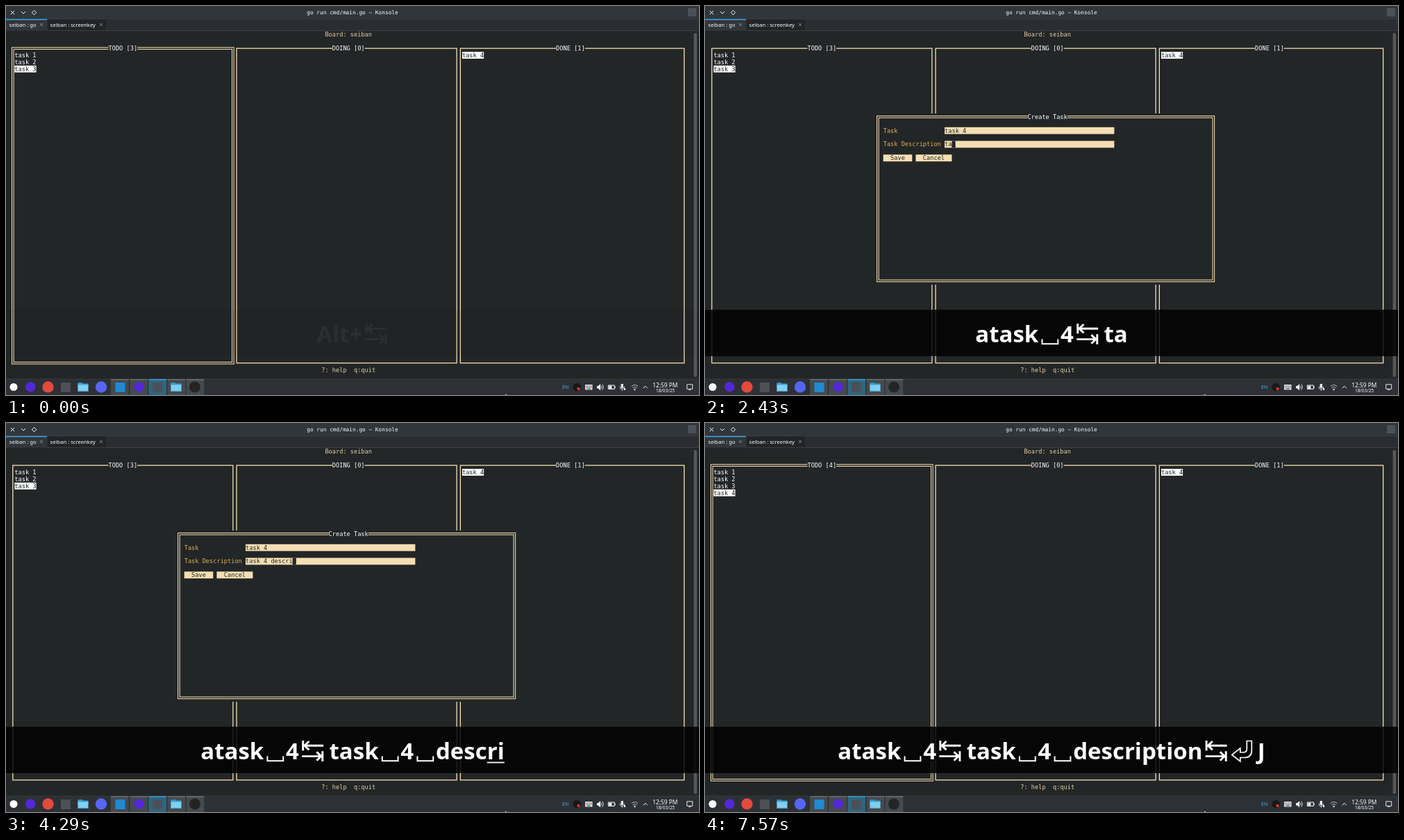
An HTML page with a canvas that plays this animation: 998 px wide and 561 px high, repeating every 8000 ms.

```html
<!DOCTYPE html>
<html lang="en">
<head>
<meta charset="utf-8">
<title>Terminal board</title>
<style>
html, body { margin: 0; height: 100%; overflow: hidden; background: #232627; }
canvas { display: block; width: 100vw; height: 100vh; }
</style>
</head>
<body>
<canvas></canvas>
<script>
const W = 998, H = 561, LOOP = 8000;
const CELL_W = 5.198, CELL_H = 9.876, LEFT = 2, TOP = 36.5;
const BG = '#232627', WHEAT = '#f5deb3', WHITE = '#fcfcfc', LABEL = '#e0ae55', PANEL = '#2d3136';
const MONO = '"DejaVu Sans Mono", monospace', SANS = '"Noto Sans", sans-serif';
const TERM_FONT = `8.63px ${MONO}`, KEY_FONT = `bold 33px ${SANS}`;

// Key presses: time, keys, and whether they are underlined for a moment.
const KEYS = [
  [290, 'a'],
  [1140, 't'], [1290, 'a'], [1430, 's'], [1570, 'k'], [1710, ' '], [1860, '4'], [2140, '⇆'],
  [2290, 't'], [2430, 'a'], [2570, 's'], [2710, 'k'], [2860, ' '], [3290, '4'], [3570, ' '],
  [3710, 'd'], [3860, 'e'], [4000, 's'], [4140, 'c'], [4290, 'ri', true],
  [4430, 'p'], [4570, 't'], [4710, 'i'], [4860, 'o'], [5000, 'n'], [5140, '⇆'],
  [5290, '⏎', true], [6140, 'J']
];
const RECENT_MS = 140;

const canvas = document.querySelector('canvas');
const ctx = canvas.getContext('2d');
const scale = window.devicePixelRatio || 1;
canvas.width = Math.round(W * scale);
canvas.height = Math.round(H * scale);

const colX = c => LEFT + c * CELL_W;
const rowY = r => TOP + r * CELL_H;

function rect(x, y, w, h, color) {
  ctx.fillStyle = color;
  ctx.fillRect(x, y, w, h);
}

function disc(x, y, r, color) {
  ctx.fillStyle = color;
  ctx.beginPath();
  ctx.arc(x, y, r, 0, 7);
  ctx.fill();
}

function text(str, x, y, font, color, align = 'left') {
  ctx.font = font;
  ctx.fillStyle = color;
  ctx.textAlign = align;
  ctx.fillText(str, x, y);
}

function stroke(path, x, y, color = WHITE, width = 1) {
  ctx.save();
  ctx.translate(x, y);
  ctx.strokeStyle = color;
  ctx.lineWidth = width;
  ctx.stroke(new Path2D(path));
  ctx.restore();
}

function cells(str, col, row, color, fill) {
  if (fill) rect(colX(col), rowY(row), str.length * CELL_W, CELL_H, fill);
  text(str, colX(col), rowY(row) + 7.9, TERM_FONT, color);
}

function frame(c0, r0, c1, r1, isDouble, title, titleCol) {
  const x = colX(c0 + .5), y = rowY(r0 + .5) - .1;
  const w = (c1 - c0) * CELL_W, h = (r1 - r0) * CELL_H - .5;
  ctx.strokeStyle = WHEAT;
  ctx.lineWidth = isDouble ? 1.05 : 1.3;
  for (const d of isDouble ? [-1.3, 1.3] : [0])
    ctx.strokeRect(x + d, y + d, w - 2 * d, h - 2 * d);
  cells(title, titleCol, r0, WHITE, BG);
}

function drawWindow() {
  rect(0, 0, W, H, BG);
  rect(0, 0, W, 18.5, '#31363b');
  rect(0, 18.5, W, 17, '#2a2e32');
  rect(0, 18.5, W, .6, '#44494d');
  rect(60, 19.5, 84, 15.5, '#222528');
  rect(0, 19, 59, 16.5, '#31363b');
  rect(0, 18.8, 59, 1.4, '#3daee9');
  rect(59, 35, W - 59, .7, '#454a4e');

  stroke('M-2.6-2.6L2.6 2.6M2.6-2.6L-2.6 2.6', 9.5, 9.5);
  stroke('M-3-1.5L0 1.5L3-1.5', 25, 9.5);
  stroke('M0-3.2L3.2 0L0 3.2L-3.2 0Z', 40.5, 9.5);
  rect(982, 3, 12, 12, '#4b5157');
  text('go run cmd/main.go — Konsole', 499, 12.2, `7.8px ${MONO}`, WHITE, 'center');
  text('seiban : go', 4.6, 29.8, `7.63px ${SANS}`, WHITE);
  text('seiban : screenkey', 63.6, 29.8, `7.63px ${SANS}`, WHITE);
  for (const x of [51, 137])
    stroke('M-2-2L2 2M2-2L-2 2', x, 26.8, '#a0a4a8', .8);

  rect(986.5, 36, .6, 502, '#2b2f32');
  ctx.fillStyle = '#55595c';
  ctx.beginPath();
  ctx.roundRect(990.5, 39, 4.5, 496, 2);
  ctx.fill();
}

function folder(x) {
  rect(x - 7.5, 543, 7, 4, '#2d8dbb');
  rect(x - 7.5, 544.5, 15, 5, '#3aa5d8');
  rect(x - 7.5, 546.5, 15, 9.5, '#83cff0');
  rect(x - 7.5, 554.7, 15, 1.3, '#4eaad4');
}

function drawTaskbar() {
  rect(0, 538, W, 23, PANEL);
  rect(0, 537.6, W, .6, '#3b4045');
  for (const x of [151, 178.3, 205.3, 232.5, 259.5]) {
    const active = x === 205.3;
    rect(x, 538.5, 25.8, 22.5, active ? '#2f6580' : '#454a4e');
    rect(x, 538.2, 25.8, 1.2, active ? '#3daee9' : '#73787c');
  }
  disc(11, 549.5, 5.5, WHITE);
  disc(35.3, 549.5, 7.2, '#5428d8');
  disc(60.5, 549.5, 8.2, '#e24a3c');
  rect(79, 543, 14, 14, '#4b5157');
  folder(111);
  disc(137, 549.5, 8.2, '#5865f2');
  rect(157.5, 543, 14, 14, '#1f8ad2');
  disc(191.5, 549.5, 7.2, '#5428d8');
  rect(211, 543, 14, 14, '#4b5157');
  folder(245);
  disc(272, 549.5, 8, '#242427');

  text('EN', 801, 552.4, `7px ${SANS}`, '#3daee9');
  disc(822.2, 549.7, 5.8, '#17181a');
  disc(824.5, 552, 2.2, '#e03030');
  rect(834, 546, 10.5, 7.5, '#e6e7e8');
  for (let i = 0; i < 4; i++) rect(835.2 + i * 2.3, 547.5, 1.2, 1.1, PANEL);
  for (let i = 0; i < 4; i++) rect(835.2 + i * 2.3, 549.5, 1.2, 1.1, PANEL);
  rect(836.5, 551.6, 5.5, .9, PANEL);

  ctx.fillStyle = WHITE;
  ctx.fill(new Path2D('M851 548H853L856 545V554.5L853 551.5H851Z'));
  stroke('M0-2Q2 0 0 2M1.5-4Q5 0 1.5 4', 857, 549.7, WHITE, .9);
  stroke('M-5-2.7H4V2.7H-5ZM5-1V1', 872.3, 549.7);
  rect(868.3, 547.8, 4, 4, WHITE);
  rect(885.7, 545, 3.2, 6, WHITE);
  stroke('M-3-1V1Q-3 3 0 3Q3 3 3 1V-1M0 3V5.5', 887.3, 549.5, WHITE, .8);
  rect(890, 551, 2, 3, WHITE);
  stroke('M-4.7-2Q0-6 4.7-2M-3 .2Q0-2.5 3 .2M-1.4 2.2Q0 1 1.4 2.2', 905.5, 550.5, '#b8bbbe', 1);
  disc(905.5, 553.4, .9, WHITE);
  stroke('M-3 1.5L0-1.5L3 1.5', 920.7, 549.7);
  text('12:59 PM', 949.3, 549.8, `8.3px ${SANS}`, WHITE, 'center');
  text('18/03/25', 949.5, 556.7, `6.5px ${SANS}`, WHITE, 'center');
  stroke('M-4-3.5H4V3H-4ZM-1.5 4.3H1.5', 984.7, 549.3, WHITE, .9);
  rect(719, 560, 1.6, 1, WHITE);
}

function drawBoard(typed) {
  const open = typed !== '' && !typed.includes('⏎');
  const saved = typed.includes('⏎');
  const count = saved ? 4 : 3;
  const selected = typed.endsWith('J') ? 4 : 3;

  cells('Board: seiban', 88, 0, '#e3cfa8');
  frame(1, 2, 62, 48, !open, `TODO [${count}]`, 28);
  frame(63, 2, 124, 48, false, 'DOING [0]', 90);
  frame(125, 2, 187, 48, false, 'DONE [1]', 152);
  for (let i = 1; i <= count; i++) {
    const on = i === selected;
    cells('task ' + i, 2, 2 + i, on ? BG : WHITE, on && WHITE);
  }
  cells('task 4', 126, 3, BG, WHITE);
  cells('?: help  q:quit', 87, 49, '#e3cfa8');
  if (open) drawForm(typed.slice(1).split('⇆'));
}

function drawForm(values) {
  const focus = values.length - 1;
  rect(colX(47), rowY(12), 94 * CELL_W, 25 * CELL_H, BG);
  frame(47, 12, 140, 36, true, 'Create Task', 89);
  ['Task', 'Task Description'].forEach((label, i) => {
    const row = 14 + 2 * i, value = values[i] || '';
    cells(label, 49, row, LABEL);
    cells(value.padEnd(47), 66, row, BG, WHEAT);
    if (focus === i) rect(colX(66 + value.length), rowY(row), CELL_W, CELL_H, BG);
  });
  const onSave = focus === 2;
  cells('  Save  ', 49, 18, onSave ? WHEAT : BG, onSave ? BG : WHEAT);
  cells('  Cancel  ', 58, 18, BG, WHEAT);
}

const GLYPHS = {
  ' ': { advance: 31.75, path: 'M5.2 480.5V487.2H28V480.5', width: 2 },
  '⇆': {
    advance: 37.7, width: 2.9,
    path: 'M5.8 458V472.5M35.3 465.2H8M14.5 459L8 465.2L14.5 471.4' +
          'M33.9 473.2V488M4.3 480.6H32M25.5 474.4L32 480.6L25.5 486.8'
  },
  '⏎': {
    advance: 33.5, width: 1.7,
    path: 'M24 458.5H31V472Q31 482.5 21 482.5H14.5V488L2.5 478.5L14.5 469V475H19Q24 475 24 470Z'
  }
};

function layout(keys) {
  const items = keys.match(/[^ ⇆⏎]+|[ ⇆⏎]/g);
  let x = 0;
  ctx.font = KEY_FONT;
  const placed = items.map((str, i) => {
    const prev = items[i - 1];
    if (prev === '⇆' || prev === '⏎') x += str === '⏎' ? 2.3 : 5.9;
    const glyph = GLYPHS[str];
    const item = { str, glyph, x, w: glyph ? glyph.advance : ctx.measureText(str).width };
    x += item.w;
    return item;
  });
  return { placed, width: x };
}

function drawKeys(keys, recent, alpha) {
  const { placed, width } = layout(keys);
  const start = 499 - width / 2;
  ctx.globalAlpha = alpha;
  rect(0, 438, W, 67, 'rgba(0,0,0,.84)');
  for (const { str, glyph, x } of placed) {
    if (glyph) stroke(glyph.path, start + x, 0, '#fff', glyph.width);
    else text(str, start + x, 484.6, KEY_FONT, '#fff');
  }
  if (recent) {
    const last = placed[placed.length - 1];
    ctx.font = KEY_FONT;
    const w = last.glyph ? last.w : ctx.measureText(recent).width;
    rect(start + width - w, 488.7, w, 1.8, '#fff');
  }
  ctx.globalAlpha = 1;
}

function draw(t) {
  const pressed = KEYS.filter(([at]) => at <= t);
  const typed = pressed.map(([, key]) => key).join('');
  ctx.setTransform(canvas.width / W, 0, 0, canvas.height / H, 0, 0);
  drawWindow();
  drawBoard(typed);
  drawTaskbar();
  if (typed) {
    const [at, key, fast] = pressed[pressed.length - 1];
    drawKeys(typed, fast && t < at + RECENT_MS ? key : '', 1);
  } else if (t < 140) {
    drawKeys('Alt+⇆', '', .05);
  }
}

function tick() {
  draw(performance.now() % LOOP);
  requestAnimationFrame(tick);
}
tick();
</script>
</body>
</html>
```
